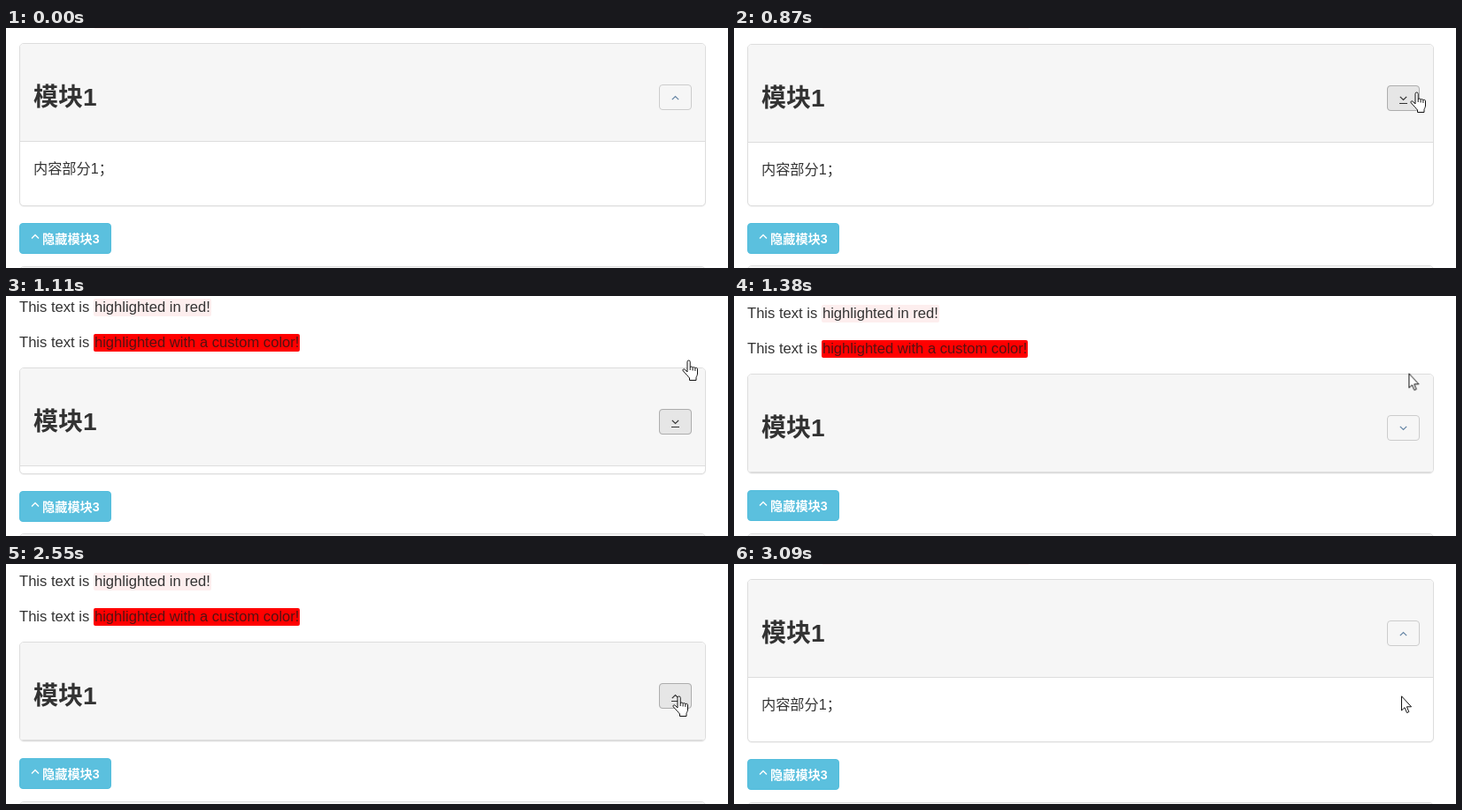
An HTML page for the animation above (3150 ms loop, 816 by 272 pixels).

```html
<!DOCTYPE html>
<html lang="zh-CN">
<head>
<meta charset="utf-8">
<title>折叠模块</title>
<style>
/* --s: page shift in px, --h: button hovered, --d: chevron direction */
@property --s { syntax: "<integer>"; inherits: true; initial-value: 0; }
@property --h { syntax: "<integer>"; inherits: true; initial-value: 0; }
@property --d { syntax: "<integer>"; inherits: true; initial-value: 1; }

html, body { margin: 0; width: 100%; height: 100%; overflow: hidden; background: #fff; }

.stage {
  position: relative; width: 816px; height: 272px; overflow: hidden;
  font: 16.6px/24px "Liberation Sans", "Noto Sans CJK SC", "Noto Sans CJK", sans-serif;
  color: #333; white-space: nowrap;
  --low: max(0, var(--s) - 70);
  animation: 3150ms step-end infinite;
  animation-name: slide, hover, flip;
}
.stage * { box-sizing: border-box; }
.stage div, .stage p, .stage h3, .stage svg { position: absolute; margin: 0; }

.intro { left: 15px; top: calc(var(--s) * 1px - 63px); }
.intro p + p { top: 40px; }
mark { padding: 0 1px 1px; border-radius: 2px; background: #fdeeee; color: inherit; }
mark.custom { background: #f00; color: #511; }
.edge {
  left: 100px; top: 0; width: 233px; height: 1px; background: #fff3f3;
  opacity: calc(1 - min(1, max(0, var(--s) - 1)));
}

.panel {
  left: 15px; width: 776px; border: 1px solid #ddd; border-radius: 5px;
  background: #fff; box-shadow: 0 1px 1px rgba(0, 0, 0, .05); overflow: hidden;
}
.first {
  top: calc(17px + var(--s) * 1px);
  height: calc(185px - (var(--s) + var(--low)) * 1px);
}
.next { top: calc(270px - min(1, var(--s)) * 1px); height: 60px; }
.head { left: 0; top: 0; width: 100%; height: 111px; background: #f6f6f6; border-bottom: 1px solid #ddd; }
h3 { left: 15px; top: 45px; font-size: 28px; line-height: 32px; font-weight: bold; }
.text { left: 15px; top: 129px; font-size: 16.2px; }

.toggle, .hot { border: 1px solid #ccc; border-radius: 4px; }
.toggle { left: 722px; top: 46px; width: 37px; height: 29px; }
.hot { inset: -1px; background: #e6e6e6; border-color: #adadad; opacity: var(--h); }
.toggle svg { left: -1px; top: -1px; }
.chevron { transform: scaleY(var(--d)); transform-origin: 18.5px 15px; }
.plain { stroke: #6484a4; opacity: calc(1 - var(--h)); }
.lit { stroke: #333; opacity: var(--h); }

.info {
  left: 15px; top: calc(221px - var(--low) * 1px); width: 104px; height: 35px;
  border: 1px solid #52bddc; border-radius: 4px; background: #5bc0de;
  color: #fff; font-size: 14.2px; font-weight: bold; line-height: 34px; padding-left: 25px;
}
.info svg { left: 12px; top: 11px; }

.cursor { left: 0; top: 0; animation: move 3150ms linear infinite; }
.hand { opacity: var(--h); }
.arrow { opacity: calc(1 - var(--h)); }

@keyframes slide {
  0% { --s: 0; }
  26.921% { --s: 0; animation-timing-function: cubic-bezier(.3642, 0, .6358, 1); }
  37.397% { --s: 71; }
  80.889% { --s: 71; animation-timing-function: cubic-bezier(.3642, 0, .6358, 1); }
  91.365%, 100% { --s: 0; }
}
@keyframes hover {
  0%, 38.095%, 92.381%, 100% { --h: 0; }
  15.238%, 50.794% { --h: 1; }
}
@keyframes flip {
  0%, 80.635%, 100% { --d: 1; }
  26.667% { --d: -1; }
}
@keyframes move {
  0% { transform: translate(740px, 226px); opacity: 0; animation-timing-function: step-end; }
  1.905% { transform: translate(740px, 226px); opacity: 1; animation-timing-function: ease-in-out; }
  16.19%, 40% { transform: translate(764px, 72px); opacity: 1; animation-timing-function: ease-in-out; }
  51.429%, 60% { transform: translate(753px, 136px); opacity: 1; animation-timing-function: ease-in-out; }
  68.254%, 100% { transform: translate(753px, 149px); opacity: 1; }
}
</style>
</head>
<body>
<div class="stage">
  <div class="edge"></div>
  <div class="intro">
    <p>This text is <mark>highlighted in red!</mark></p>
    <p>This text is <mark class="custom">highlighted with a custom color!</mark></p>
  </div>

  <div class="panel first">
    <div class="head">
      <h3>模块1</h3>
      <div class="toggle">
        <div class="hot"></div>
        <svg width="37" height="29" fill="none" stroke-width="1.2">
          <g class="chevron">
            <path class="plain" d="M14.8 17.2l3.7-3.7 3.7 3.7"/>
            <path class="lit" d="M14.8 17.2l3.7-3.7 3.7 3.7"/>
          </g>
          <path class="lit" d="M14 20.5h9" stroke-width="1"/>
        </svg>
      </div>
    </div>
    <p class="text">内容部分1；</p>
  </div>

  <div class="info">
    <svg width="10" height="8" fill="none" stroke="#fff" stroke-width="1.4"><path d="M1 5.5l4-4 4 4"/></svg>
    隐藏模块3
  </div>

  <div class="panel next"><div class="head"></div></div>

  <svg class="cursor" width="20" height="26" fill="#fff" stroke="#111" stroke-linejoin="round">
    <path class="arrow" d="M1.5 .8V17L5 13.7 7.5 19.6 9.8 18.6 7.4 12.8H12.5z"/>
    <g class="hand">
      <path d="M6 14V2.6a1.6 1.6 0 0 1 3.2 0V9a1.5 1.5 0 0 1 2.9.4 1.5 1.5 0 0 1 2.8.6 1.4 1.4 0 0 1 2.6.8V16c0 2-1.2 3-1.5 4.5v3H8.5V21C7 19 4 16 1.2 12.8c-1-1.3.8-2.7 2-1.6z"/>
      <path d="M9.2 9v3M12.1 9.5v3M14.9 10.1v2.8" fill="none"/>
    </g>
  </svg>
</div>
</body>
</html>
```
